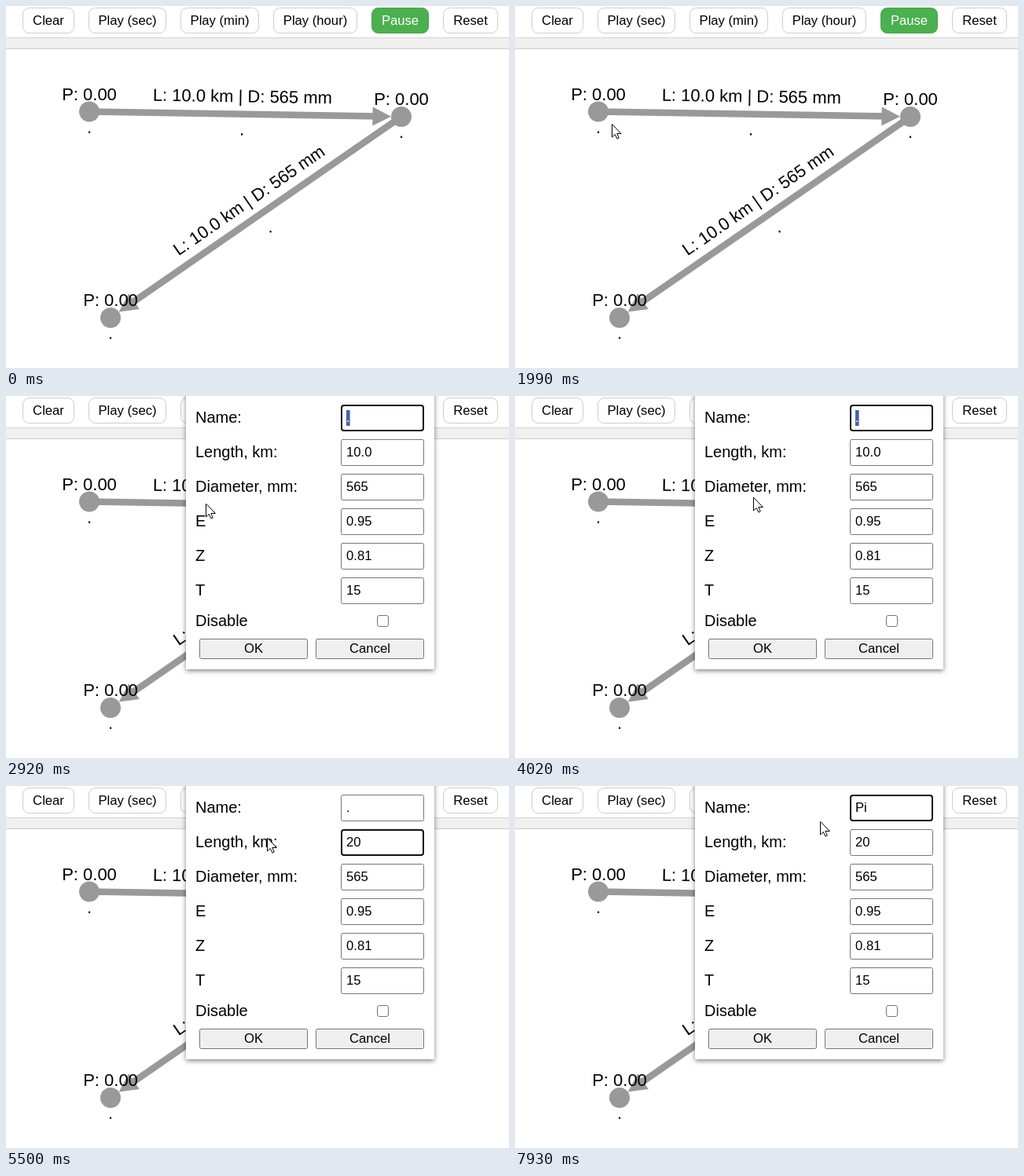
Write an HTML page with a canvas that moves like this. It is 640 px wide and 461 px high and loops after 7990 ms.

```html
<!DOCTYPE html>
<html lang="en">
<head>
<meta charset="utf-8">
<title>Pipeline editor</title>
<style>
  html, body { margin: 0; width: 100%; height: 100%; overflow: hidden; background: #fff; }
  canvas { display: block; }
</style>
</head>
<body>
<canvas id="stage" width="640" height="461"></canvas>
<script>
const ctx = document.getElementById('stage').getContext('2d');
const LOOP = 7990;
const SANS = '"Liberation Sans", Arial, sans-serif';
const UI = 16.67, LABEL = 20, GRAPH = 22;
const GRAY = '#999', BORDER = '#767676';

const DIALOG_OPEN = 2920;
const LENGTH_FOCUS = 4420, LENGTH_TYPED = 4900;
const NAME_FOCUS = 6040, NAME_TYPED = 7070;

const between = (t, a, b) => t >= a && t < b;
const linear = u => u;
const smooth = u => u * u * (3 - 2 * u);
const easeIn = u => u ** 2.27;
const easeOut = p => u => 1 - (1 - u) ** p;

// The pointer advances in discrete steps: start, end, steps, from, to, easing
const moves = [
  [660, 1120, 8, [650, 500], [193, 258], easeOut(2)],
  [1260, 1730, 8, [193, 258], [117, 151], smooth],
  [1990, 2190, 4, [117, 151], [257, 126], easeIn],
  [2390, 2450, 2, [257, 126], [254, 137], linear],
  [4020, 4420, 7, [252, 147], [472, 70], easeOut(1.7)],
  [4490, 4760, 5, [472, 69], [357, 69], linear],
  [4900, 5040, 3, [357, 69], [322, 69], linear],
  [5500, 5840, 6, [322, 69], [455, 28], smooth],
  [6040, 6260, 5, [470, 28], [380, 29], linear],
  [6400, 6470, 2, [380, 29], [388, 45], linear]
];

function pointerAt(t) {
  const move = moves.filter(m => t >= m[0]).pop();
  if (!move) return null;
  const [start, end, steps, from, to, ease] = move;
  const step = Math.min(steps, 1 + Math.floor((t - start) / (end - start) * (steps - 1)));
  const u = ease(step / steps);
  return from.map((v, i) => Math.round(v + (to[i] - v) * u));
}

function text(str, x, y, size, color = '#000', align = 'left') {
  ctx.font = `${size}px ${SANS}`;
  ctx.textAlign = align;
  ctx.fillStyle = color;
  ctx.fillText(str, x, y);
}

function box(x, y, w, h, r, fill, stroke, line = 1) {
  const inset = line / 2;
  ctx.beginPath();
  ctx.roundRect(x + inset, y + inset, w - line, h - line, r);
  ctx.fillStyle = fill;
  ctx.fill();
  ctx.lineWidth = line;
  ctx.strokeStyle = stroke;
  ctx.stroke();
}

function disc(x, y, r, color) {
  ctx.beginPath();
  ctx.arc(x, y, r, 0, Math.PI * 2);
  ctx.fillStyle = color;
  ctx.fill();
}

function segment(a, b, width, color, cap = 'butt') {
  ctx.beginPath();
  ctx.moveTo(...a);
  ctx.lineTo(...b);
  ctx.lineWidth = width;
  ctx.lineCap = cap;
  ctx.strokeStyle = color;
  ctx.stroke();
}

function drawToolbar() {
  ctx.fillStyle = '#f0f0f0';
  ctx.fillRect(0, 0, 640, 54);
  box(-4, -20, 700, 61, 6, '#fff', '#d4d4d4');
  ctx.fillStyle = '#ccc';
  ctx.fillRect(0, 54, 640, 1);
  const buttons = [
    ['Clear', 21, 66], ['Play (sec)', 105, 99], ['Play (min)', 222, 100],
    ['Play (hour)', 340, 107], ['Pause', 465, 73], ['Reset', 556, 70]
  ];
  for (const [label, x, w] of buttons) {
    const active = label === 'Pause';
    box(x, 2, w, 33, 8, active ? '#4caf50' : '#fff', active ? '#47a44b' : '#ccc');
    text(label, x + w / 2, 24, UI, active ? '#fff' : '#000', 'center');
  }
}

function caption(x, y, str, angle = 0) {
  ctx.save();
  ctx.translate(x, y);
  ctx.rotate(angle);
  text(str, 0, -15, GRAPH, '#000', 'center');
  text('.', 0, 27, GRAPH, '#000', 'center');
  ctx.restore();
}

const nodes = [[106, 134.5], [503, 141], [133, 397]];

function drawArrow([x1, y1], [x2, y2]) {
  const angle = Math.atan2(y2 - y1, x2 - x1);
  const tip = Math.hypot(x2 - x1, y2 - y1) - 13;
  ctx.save();
  ctx.translate(x1, y1);
  ctx.rotate(angle);
  segment([0, 0], [tip - 15, 0], 8.6, GRAY);
  ctx.beginPath();
  ctx.moveTo(tip, 0);
  ctx.lineTo(tip - 23.5, -12);
  ctx.lineTo(tip - 23.5, 12);
  ctx.fillStyle = GRAY;
  ctx.fill();
  ctx.restore();
}

function drawGraph(highlight) {
  const [a, b, c] = nodes;
  drawArrow(b, c);
  drawArrow(a, b);
  if (highlight) segment([121, 134.7], [475, 140.5], 43, 'rgba(0,0,0,.25)', 'round');
  for (const [x, y] of nodes) {
    disc(x, y, 13, GRAY);
    caption(x, y, 'P: 0.00');
  }
  const pipe = 'L: 10.0 km | D: 565 mm';
  caption(300.5, 137.5, pipe, Math.atan2(b[1] - a[1], b[0] - a[0]));
  caption(322, 266, pipe, Math.atan2(c[1] - b[1], c[0] - b[0]) - Math.PI);
}

// Selection is a character range; caret sits after the text.
function drawField(y, value, { focus = false, select = null, tint = '#3264cc', caret = false } = {}) {
  box(426, y, 106, 34, focus ? 3 : 2, '#fff', focus ? '#101010' : BORDER, focus ? 2 : 1);
  const left = 433, base = y + 22;
  text(value, left, base, UI);
  const edge = n => left + ctx.measureText(value.slice(0, n)).width;
  if (select) {
    const [from, to] = select.map(edge);
    ctx.fillStyle = tint;
    ctx.fillRect(from, y + 7, to - from, 20);
    text(value.slice(...select), from, base, UI, '#fff');
  }
  if (caret) {
    ctx.fillStyle = '#000';
    ctx.fillRect(Math.floor(edge(value.length)), y + 7, 1, 19);
  }
}

function nameField(t) {
  const value = t < NAME_TYPED ? '.' : t < 7400 ? 'P' : 'Pi';
  const focus = t < LENGTH_FOCUS || t >= NAME_FOCUS;
  const selected = t < LENGTH_FOCUS || between(t, 6150, NAME_TYPED);
  drawField(11, value, {
    focus,
    select: selected ? [0, 1] : null,
    tint: t < LENGTH_FOCUS ? '#4862a6' : '#3264cc',
    caret: between(t, NAME_FOCUS, 6150) || between(t, NAME_TYPED, 7930)
  });
}

function lengthField(t) {
  const value = t < LENGTH_TYPED ? '10.0' : t < 4970 ? '2' : '20';
  const select = between(t, 4560, 4690) ? [2, 4] : between(t, 4690, LENGTH_TYPED) ? [0, 4] : null;
  drawField(55, value, {
    focus: between(t, LENGTH_FOCUS, NAME_FOCUS),
    select,
    caret: between(t, LENGTH_FOCUS, 4560) || between(t, LENGTH_TYPED, 5500)
  });
}

function drawDialog(t) {
  ctx.save();
  ctx.shadowColor = 'rgba(0,0,0,.5)';
  ctx.shadowBlur = 6;
  ctx.shadowOffsetY = 2;
  ctx.fillStyle = '#fff';
  ctx.fillRect(229, -10, 316, 358);
  ctx.restore();

  const labels = ['Name:', 'Length, km:', 'Diameter, mm:', 'E', 'Z', 'T'];
  labels.forEach((label, i) => text(label, 241, 34 + i * 44, LABEL));
  text('Disable', 241, 293, LABEL);

  nameField(t);
  lengthField(t);
  ['565', '0.95', '0.81', '15'].forEach((value, i) => drawField(99 + i * 44, value));

  box(472, 279, 15, 15, 2.5, '#fff', BORDER);
  for (const [label, x] of [['OK', 246], ['Cancel', 394]]) {
    box(x, 309, 138, 26, 2, '#efefef', BORDER);
    text(label, x + 69, 327, UI, '#000', 'center');
  }
}

function drawArrowPointer(x, y) {
  const outline = [[0, 0], [0, 16.5], [3.8, 13], [6.4, 18.6], [8.8, 17.5], [6.3, 12], [11.5, 12]];
  ctx.beginPath();
  outline.forEach(([dx, dy]) => ctx.lineTo(x + 0.5 + dx, y + 0.5 + dy));
  ctx.closePath();
  ctx.fillStyle = '#fff';
  ctx.fill();
  ctx.lineWidth = 1;
  ctx.lineJoin = 'miter';
  ctx.strokeStyle = '#000';
  ctx.stroke();
}

function drawTextPointer(x, y) {
  ctx.fillStyle = '#000';
  ctx.fillRect(x, y - 8, 1, 17);
  for (const dy of [-8, 8]) {
    ctx.fillRect(x - 3, y + dy, 3, 1);
    ctx.fillRect(x + 1, y + dy, 3, 1);
  }
}

function drawPointer(t) {
  const at = pointerAt(t);
  if (!at) return;
  const [x, y] = at;
  if (between(t, 2790, DIALOG_OPEN)) disc(x, y + 1, 15, 'rgba(235,50,50,.72)');
  if (between(t, LENGTH_FOCUS, 4760) || between(t, NAME_FOCUS, 6400)) {
    ctx.globalCompositeOperation = 'multiply';
    disc(x, y, 15, '#fffa80');
    ctx.globalCompositeOperation = 'source-over';
  }
  const overField = t >= DIALOG_OPEN && between(x, 426, 532) && (between(y, 11, 45) || between(y, 55, 89));
  (overField ? drawTextPointer : drawArrowPointer)(x, y);
}

function render(t) {
  ctx.fillStyle = '#fff';
  ctx.fillRect(0, 0, 640, 461);
  drawToolbar();
  drawGraph(between(t, 2790, DIALOG_OPEN));
  if (t >= DIALOG_OPEN) drawDialog(t);
  drawPointer(t);
}

const origin = performance.now();
function tick() {
  render((performance.now() - origin) % LOOP);
  requestAnimationFrame(tick);
}
tick();
</script>
</body>
</html>
```
